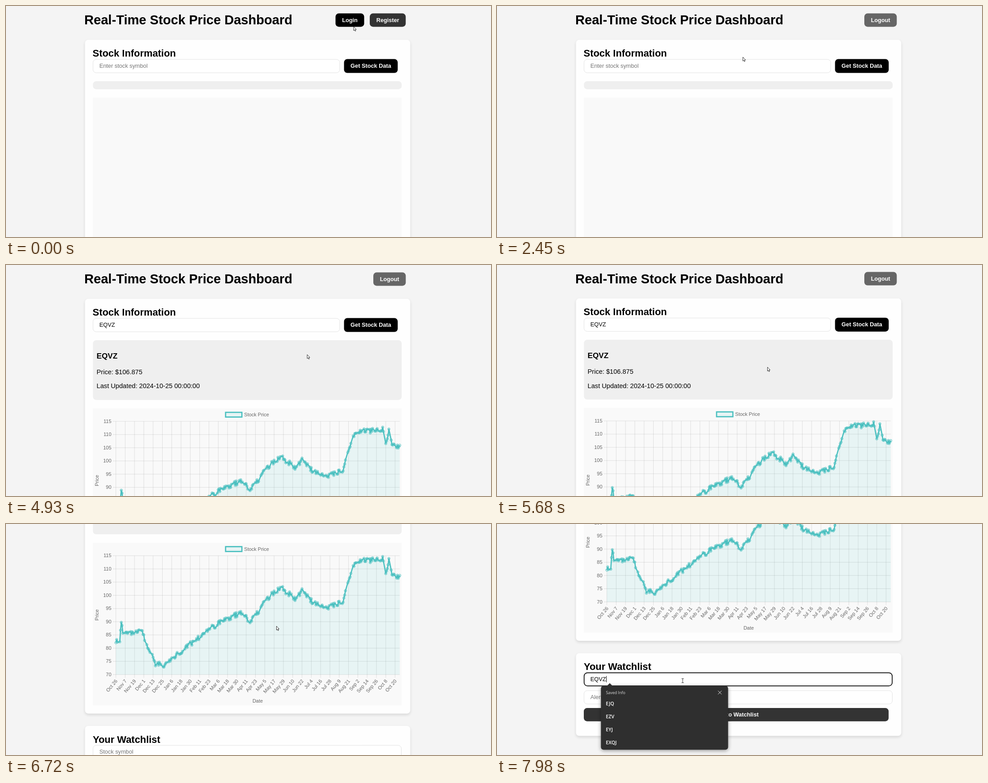
An HTML page with a canvas for the animation above (8000 ms loop, 1084x516 px).

```html
<!DOCTYPE html>
<html lang="en">
<head>
<meta charset="utf-8">
<title>Stock Dashboard</title>
<style>
html, body { margin: 0; width: 100%; height: 100%; overflow: hidden; background: #f4f4f4; }
canvas { display: block; width: 1084px; height: 516px; }
</style>
</head>
<body>
<canvas id="stage" width="1084" height="516"></canvas>
<script>
const ctx = document.getElementById('stage').getContext('2d');
const LOOP = 8000;
const SANS = '"Liberation Sans", Arial, sans-serif';
const UI = '"Open Sans", "Noto Sans", sans-serif';
const TEAL = '#4bc0c0';
const SYMBOL = 'EQVZ';

// Moments of the session, in ms
const T = { form: 370, alert: 1220, alertEnd: 1960, loggedIn: 2110, focus: 2920, blur: 4200, data: 4560, watch: 7790 };

const SCROLL = [[5650, 0], [5680, 0.7], [6230, 117.4], [7040, 383], [7250, 440.7]];

const MOVES = [
  { at: 80, len: 70, x: 775, y: 37, kind: 'hand' },
  { at: T.form, len: 680, x: 544, y: 183, kind: 'hand' },
  { at: 1430, len: 420, x: 706, y: 74, kind: 'arrow' },
  { at: T.loggedIn, len: 610, x: 440, y: 142, kind: 'beam' },
  { at: 3600, len: 250, x: 801, y: 148, kind: 'hand' },
  { at: 4600, len: 550, x: 604.5, y: 228, kind: 'arrow' },
  { at: 7250, len: 430, x: 415, y: 350, kind: 'beam' }
];

// Turning points of the price: [day, close]
const TURNS = [
  [0, 83], [5, 83], [7, 90], [9, 85.5], [33, 86.5], [51, 74], [63, 73.7], [84, 78.7],
  [113, 85.6], [138, 90.5], [163, 93.5], [173, 90], [198, 99.5], [212, 103], [233, 98.5],
  [241, 102.3], [252, 97.8], [274, 95.7], [293, 97.8], [303, 109], [310, 112.8],
  [345, 113.8], [348, 108], [352, 114], [356, 108], [366, 106.8]
];

const clamp = v => Math.max(0, Math.min(1, v));
const ramp = (t, start, len) => clamp((t - start) / len);
const smooth = u => u * u * (3 - 2 * u);
const mix = (a, b, u) => a + (b - a) * u;
const grey = v => `rgb(${v},${v},${v})`;

// Straight lines through [x, y] points, level before and after them
function along(points, x) {
  const i = points.findIndex(p => p[0] > x);
  if (i === 0) return points[0][1];
  if (i < 0) return points[points.length - 1][1];
  const [x0, y0] = points[i - 1], [x1, y1] = points[i];
  return mix(y0, y1, (x - x0) / (x1 - x0));
}

function seeded(seed) {
  return () => (seed = (seed * 16807) % 2147483647) / 2147483647;
}

function buildSeries() {
  const random = seeded(20);
  const out = [];
  for (let day = 0; day <= 366; day++) {
    const weekend = day % 7 === 3 || day % 7 === 4;
    if (!weekend) out.push([day, along(TURNS, day) + (random() - 0.5) * 1.9]);
  }
  return out;
}
const SERIES = buildSeries();

function text(s, x, mid, size, color = '#000', weight = 400, align = 'left', family = SANS) {
  ctx.font = `${weight} ${size}px ${family}`;
  ctx.textAlign = align;
  ctx.fillStyle = color;
  ctx.fillText(s, x, mid + size * 0.358);
}

function box(x, y, w, h, r, fill, stroke, width = 1) {
  ctx.beginPath();
  ctx.roundRect(x, y, w, h, r);
  if (fill) { ctx.fillStyle = fill; ctx.fill(); }
  if (stroke) { ctx.strokeStyle = stroke; ctx.lineWidth = width; ctx.stroke(); }
}

function shadowed(color, blur, dy, draw) {
  ctx.save();
  ctx.shadowColor = color;
  ctx.shadowBlur = blur;
  ctx.shadowOffsetY = dy;
  draw();
  ctx.restore();
}

function card(top, bottom) {
  shadowed('rgba(0,0,0,.12)', 6, 3, () => box(176.5, top, 727, bottom - top, 7.3, '#fefefe'));
}

function button(label, x, y, w, h, fill) {
  box(x, y, w, h, 7.3, fill);
  text(label, x + w / 2, y + h / 2 - 0.3, 12.78, '#fff', 700, 'center');
}

function field(x, y, w, value, hint, focused, caret, fill = '#fff') {
  if (focused) box(x + 0.7, y + 0.7, w - 1.4, 29.4, 7.5, fill, '#000', 1.7);
  else box(x + 0.5, y + 0.5, w - 1, 29.8, 7, fill, '#dfdfdf', 0.9);
  text(value || hint, 208.7, y + 15, 12.78, value ? '#000' : '#757575');
  if (caret) {
    const end = 209.5 + (value ? ctx.measureText(value).width : 0);
    ctx.fillStyle = '#000';
    ctx.fillRect(Math.round(end), y + 8, 1, 14);
  }
}

const typed = (t, start, step) =>
  SYMBOL.slice(0, Math.max(0, Math.floor((t - start) / step) + 1));

function header(t) {
  text('Real-Time Stock Price Dashboard', 175, 31, 29.1, '#000', 700);
  if (t < T.loggedIn) {
    const hover = ramp(t, 80, 140) * (1 - ramp(t, T.form, 200));
    button('Login', 736.5, 16.5, 64, 30, grey(26 * hover));
    button('Register', 813, 16.5, 80.4, 30, '#333');
  } else {
    button('Logout', 821, 16.5, 72.5, 30, '#666');
  }
}

function loginForm(t) {
  card(75.5, 221);
  field(194, 94, 690, 'demo', '', false, false, '#e8f0fe');
  field(194, 134, 690, '', '', false, false, '#e8f0fe');
  ctx.fillStyle = '#000';
  for (let i = 0; i < 4; i++) {
    ctx.beginPath();
    ctx.arc(211.2 + i * 4.6, 149, 1.9, 0, 7);
    ctx.fill();
  }
  button('Login', 194, 173.7, 681.3, 29.6, grey(26 * ramp(t, 950, 200)));
}

function stockCard(t) {
  const loaded = t >= T.data;
  const panelH = loaded ? 133.5 : 18;
  const chartTop = 168 + panelH + 18.8;
  card(75.5, chartTop + 381.5);
  text('Stock Information', 193.6, 105.5, 21.9, '#000', 700);
  field(194, 118.8, 552.3, typed(t, 3130, 140), 'Enter stock symbol',
    t >= T.focus && t < T.blur, t >= T.focus && t < 3620);
  const hover = ramp(t, 3740, 120) * (1 - ramp(t, 4700, 200));
  button('Get Stock Data', 755.5, 118.6, 120, 31, grey(26 * hover));
  box(194.3, 168, 690, panelH, 7.3, '#efefef');
  ctx.fillStyle = '#f9f9f9';
  ctx.fillRect(194, chartTop, 690, 363);
  if (!loaded) return;
  text(SYMBOL, 202.6, 202.8, 17.1, '#000', 700);
  text('Price: $106.875', 202.6, 238.7, 14.6);
  text('Last Updated: 2024-10-25 00:00:00', 202.6, 270.2, 14.6);
  chart(t);
}

function turned(s, x, y, angle, align) {
  ctx.save();
  ctx.translate(x, y);
  ctx.rotate(angle);
  text(s, 0, 0, 11, '#666', 400, align);
  ctx.restore();
}

function chart(t) {
  const left = 245.6, right = 880, top = 349.2, base = 614.7;
  const px = day => mix(left, right, day / 366);
  const level = v => mix(base, top, (v - 70) / 45);
  const rise = 1 - Math.pow(1 - ramp(t, T.data, 680), 4);
  const py = v => mix(base, level(v), rise);

  ctx.beginPath();
  for (let v = 70; v <= 115; v += 5) {
    ctx.moveTo(left - 7.3, level(v));
    ctx.lineTo(right, level(v));
    text(String(v), 235.5, level(v) - 0.3, 11, '#666', 400, 'right');
  }
  for (let day = 0; day <= 360; day += 12) {
    ctx.moveTo(px(day), top);
    ctx.lineTo(px(day), base + 7.3);
  }
  ctx.strokeStyle = 'rgba(0,0,0,.11)';
  ctx.lineWidth = 1;
  ctx.stroke();

  for (let day = 0; day <= 360; day += 12) {
    const date = new Date(Date.UTC(2023, 9, 26 + day));
    const label = date.toLocaleString('en-US', { month: 'short', day: 'numeric', timeZone: 'UTC' });
    turned(label, px(day) + 1, 627, -50 * Math.PI / 180, 'right');
  }
  turned('Price', 203.5, 481.5, -Math.PI / 2, 'center');
  text('Date', 562.5, 673, 11, '#666', 400, 'center');
  box(490.8, 329.1, 36.4, 10.6, 0, 'rgba(75,192,192,.1)', TEAL, 2.7);
  text('Stock Price', 532.3, 334.1, 11, '#666');

  const line = new Path2D();
  SERIES.forEach(([day, v]) => line.lineTo(px(day), py(v)));
  const area = new Path2D(line);
  area.lineTo(right, base);
  area.lineTo(left, base);
  ctx.fillStyle = 'rgba(75,192,192,.1)';
  ctx.fill(area);
  ctx.strokeStyle = TEAL;
  ctx.lineWidth = 2.7;
  ctx.lineJoin = 'round';
  ctx.stroke(line);
  ctx.lineWidth = 0.9;
  for (const [day, v] of SERIES) {
    ctx.beginPath();
    ctx.arc(px(day), py(v), 2.75, 0, 7);
    ctx.fill();
    ctx.stroke();
  }
}

function watchCard(t) {
  const on = t >= T.watch;
  card(729.3, 914);
  text('Your Watchlist', 194, 759.3, 21.9, '#000', 700);
  field(194, 772.3, 690, typed(t, T.watch, 62), 'Stock symbol', on, on);
  field(194, 812.4, 690, '', 'Alert price');
  button('Add to Watchlist', 194, 851.8, 681.3, 29.6, '#333');
}

function alertBox(t) {
  const shown = 0.9 * ramp(t, T.alert - 10, 140) + 0.1 * ramp(t, 1360, 70);
  ctx.save();
  ctx.globalAlpha = shown * (1 - ramp(t, T.alertEnd, 150));
  shadowed('rgba(0,0,0,.45)', 18, 4, () => box(341.5, -20, 408.5, 122.5, 7, '#3c3c3c'));
  text('127.0.0.1:5000 says', 357, 11.5, 12.3, '#fff', 600, 'left', UI);
  text('Logged in successfully', 356.5, 37, 11.3, '#fff', 400, 'left', UI);
  box(677, 58.8, 58.5, 29, 3, t > 1760 ? '#1f7bc9' : '#0a6fc2');
  text('OK', 706, 73, 10.6, '#fff', 600, 'center', UI);
  ctx.restore();
}

function polygon(points) {
  ctx.beginPath();
  points.forEach(([x, y]) => ctx.lineTo(x, y));
  ctx.closePath();
}

function lines(...segments) {
  ctx.beginPath();
  for (const [x0, y0, x1, y1] of segments) {
    ctx.moveTo(x0, y0);
    ctx.lineTo(x1, y1);
  }
  ctx.stroke();
}

function savedInfo() {
  shadowed('rgba(0,0,0,.4)', 8, 2, () => box(232.3, 361.5, 284.2, 142.8, 6, '#2f2f2f'));
  polygon([[245.5, 362], [252, 355.5], [258.5, 362]]);
  ctx.fillStyle = '#2f2f2f';
  ctx.fill();
  text('Saved Info', 243.5, 377.3, 8.9, '#ddd', 400, 'left', UI);
  ctx.strokeStyle = '#eee';
  ctx.lineWidth = 1;
  lines([494, 372.5, 502, 380.5], [502, 372.5, 494, 380.5]);
  ['EJQ', 'EZV', 'EYJ', 'EXQJ'].forEach((s, i) =>
    text(s, 243.3, 400.7 + i * 29.1, 10.8, '#fff', 600, 'left', UI));
}

const SHAPES = {
  arrow: [[0, 0], [0, 9], [2, 7.2], [3.4, 10.2], [4.8, 9.6], [3.5, 6.7], [6, 6.5]],
  hand: [[-1, 0], [0.8, 0], [1, 4.2], [5, 5.4], [6, 7], [4.4, 12.6], [-1, 12.6], [-4, 8], [-3.2, 6.8], [-1.2, 8]]
};

// The pointer is an arrow on the way and takes its new kind on arrival
function pointerAt(t) {
  let p = { x: 777, y: 46, kind: 'arrow' };
  for (const m of MOVES) {
    if (t < m.at) break;
    const u = smooth(ramp(t, m.at, m.len));
    const kind = u < 0.1 ? p.kind : u < 0.9 ? 'arrow' : m.kind;
    p = { x: mix(p.x, m.x, u), y: mix(p.y, m.y, u), kind };
  }
  return p;
}

function pointer(t) {
  const { x, y, kind } = pointerAt(t);
  ctx.save();
  ctx.translate(x, y);
  ctx.lineJoin = 'round';
  ctx.lineWidth = 1;
  ctx.strokeStyle = '#333';
  ctx.fillStyle = '#fff';
  if (kind === 'beam') {
    lines([-2.5, -4.5, 2.5, -4.5], [0, -4.5, 0, 4.5], [-2.5, 4.5, 2.5, 4.5]);
  } else {
    polygon(SHAPES[kind]);
    ctx.fill();
    ctx.stroke();
  }
  ctx.restore();
}

function render(t) {
  ctx.fillStyle = '#f4f4f4';
  ctx.fillRect(0, 0, 1084, 516);

  ctx.save();
  ctx.translate(0, -along(SCROLL, t));
  header(t);
  if (t >= T.form && t < T.loggedIn) {
    loginForm(t);
    ctx.translate(0, 173.3);
  }
  stockCard(t);
  if (t >= T.data) watchCard(t);
  ctx.restore();

  if (t >= T.alert && t < T.loggedIn) alertBox(t);
  if (t >= T.watch + 70) savedInfo();
  pointer(t);
}

const begin = performance.now();
function tick() {
  render((performance.now() - begin) % LOOP);
  requestAnimationFrame(tick);
}
tick();
</script>
</body>
</html>
```
